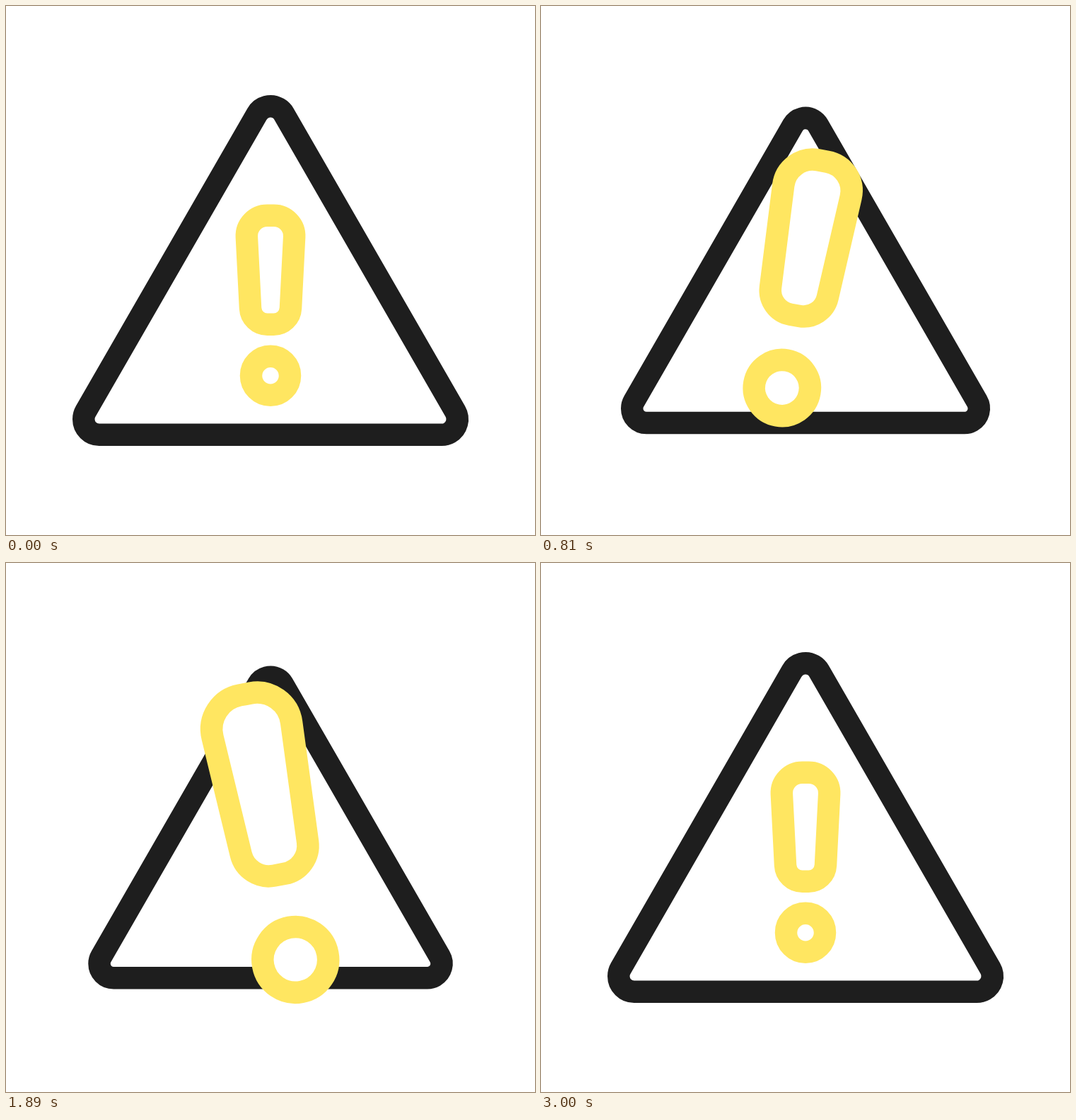
An HTML page with a canvas for the animation above (3.03 s loop, 748 px wide and 748 px high).

```html
<!DOCTYPE html>
<html lang="en">
<head>
<meta charset="utf-8">
<title>Warning sign</title>
<style>
  html, body { margin: 0; width: 100%; height: 100%; overflow: hidden; background: #fff; }
  canvas { display: block; }
</style>
</head>
<body>
<canvas id="stage" width="748" height="748"></canvas>
<script>
const ctx = document.getElementById('stage').getContext('2d');
const LOOP = 3030, CENTER = 374, RAD = Math.PI / 180;
const OVERSHOOT = 2205, SETTLE = 2640, REST = 3000;

// Sine easing from pose to pose; equal neighbouring values are a hold.
function track(times, values) {
  return t => {
    const i = times.findIndex(time => t < time);
    if (i < 0) return values[values.length - 1];
    const u = (t - times[i - 1]) / (times[i] - times[i - 1]);
    return values[i - 1] + (values[i] - values[i - 1]) * (1 - Math.cos(Math.PI * u)) / 2;
  };
}

// The mark grows, dips while it swings over, grows again, then shrinks back.
const GROW = 2.377, SHRINK = .8635, TILT = 19.1, DROP = 49;
const pulse = [0, 440, 952, 1370, 1600, OVERSHOOT, SETTLE, REST];
const squeeze = [0, 450, 977, 1500, 1758, OVERSHOOT, SETTLE, REST];
const swing = [0, 450, 566, 1326, 1680, OVERSHOOT, SETTLE, REST];
const sway = [0, 450, 810, 1170, 1890, 2280, SETTLE];

const scale = track(pulse, [1, GROW, 1.24, GROW, GROW, .91, 1.005, 1]);
const drop = track(pulse, [DROP, 0, 30, 0, 0, 46, DROP, DROP]);
const size = track(squeeze, [1, SHRINK, .947, SHRINK, SHRINK, 1.121, .997, 1]);
const angle = track(swing, [0, TILT, TILT, -TILT, -TILT, 5, -.3, 0]);
const shift = track(sway, [0, 0, -8, 1, 4, -3, 0]);

// The path is scaled and turned, the line keeps its width.
function outline(color, x, y, zoom, turn, trace) {
  ctx.save();
  ctx.translate(x, y);
  ctx.rotate(turn * RAD);
  ctx.scale(zoom, zoom);
  ctx.beginPath();
  trace();
  ctx.closePath();
  ctx.restore();
  ctx.fillStyle = '#fff';
  ctx.fill();
  ctx.strokeStyle = color;
  ctx.lineWidth = 31.5;
  ctx.stroke();
}

function triangle() {
  const corner = (x, y, from) => ctx.arc(x, y, 22, from * RAD, (from + 120) * RAD);
  corner(0, -210.25, 210);
  corner(242.25, 210.25, 330);
  corner(-242.25, 210.25, 90);
}

function bar() {
  const top = -126.8, bottom = 27.2, wide = 35.2, narrow = 27.3;
  ctx.moveTo(0, top);
  ctx.arcTo(wide, top, narrow, bottom, 29);
  ctx.arcTo(narrow, bottom, -narrow, bottom, 24);
  ctx.arcTo(-narrow, bottom, -wide, top, 24);
  ctx.arcTo(-wide, top, 0, top, 29);
}

function dot() {
  ctx.arc(0, 99.7, 27.5, 0, 2 * Math.PI);
}

function draw(now) {
  const t = now % LOOP;
  ctx.clearRect(0, 0, 748, 748);
  outline('#1e1e1e', CENTER, CENTER, size(t), 0, triangle);
  for (const part of [bar, dot])
    outline('#ffe661', CENTER + shift(t), CENTER + drop(t), scale(t), angle(t), part);
  requestAnimationFrame(draw);
}
draw(performance.now());
</script>
</body>
</html>
```
